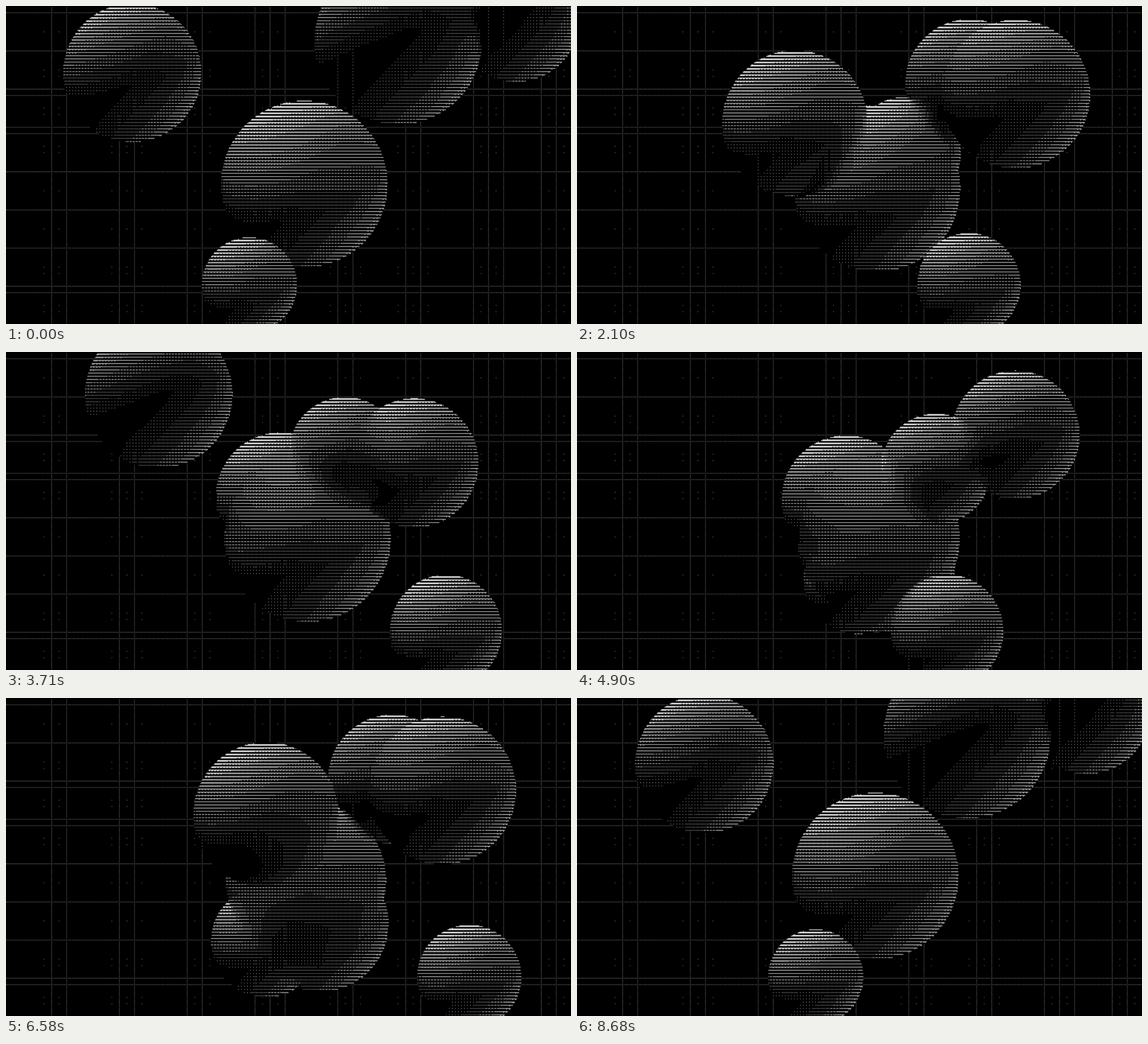
These frames come from a looping animation (998 by 561 pixels, 8750 ms). An HTML page with a canvas:

```html
<!DOCTYPE html>
<html>
<head>
<meta charset="utf-8">
<title>Dithered spheres</title>
<style>
html, body { margin: 0; width: 100%; height: 100%; overflow: hidden; background: #000; }
canvas { display: block; width: 998px; height: 561px; }
</style>
</head>
<body>
<canvas width="750" height="400"></canvas>
<script>
const W = 750, H = 400, SX = 998 / W, SY = 561 / H;
const LOOP = 8750, STEP = 70;
const ctx = document.querySelector('canvas').getContext('2d');
const img = ctx.createImageData(W, H);
const px = new Uint32Array(img.data.buffer);
const grey = v => (255 << 24 | v << 16 | v << 8 | v) >>> 0;
const BLACK = grey(0), LINE = grey(105);

// Grid: a beat pattern of dotted lines, with lone dots between them
const grid = new Uint8Array(W * H);
const mark = (x, y) => { if (x < W && y > 1 && y < H) grid[y * W + x] = 1; };
const cols = [], rows = [];
for (let n = 0; n < 8; n++)
  for (let x = Math.floor(5 + 9.5 * n); x <= 8.6 + 9.6 * n; x++)
    cols.push({ at: x * 10, line: (x - n) % 2 === 0 });
for (let n = 0; n < 16; n++)
  for (const shift of [.26, .74])
    rows.push({ at: Math.floor(1 + 3.1 * n + shift) * 8, line: n % 2 === 0 });
for (const c of cols) {
  if (c.line) for (let y = 2; y < H; y += 2) mark(c.at, y);
  else for (const r of rows) if (!r.line) mark(c.at, r.at);
}
for (const r of rows) if (r.line) for (let x = 0; x < W; x += 2) mark(x, r.at);

// Every path is a sum of whole waves per loop
function spheresAt(t) {
  const turn = 2 * Math.PI / LOOP;
  const c = (k, t0 = 0) => Math.cos(k * turn * (t - t0));
  const s = k => Math.sin(k * turn * t);
  const pulse = ((1 + c(1, 5810)) / 2) ** 12;
  const ball = (x, y, r, depth) =>
    ({ x, y, r, depth, front: .42 - .45 * Math.exp((60 - y) / 90) });
  return [
    ball(530 - 3 * c(1), 322 - 8 * c(1), 147 - 14 * pulse, -40),
    ball(430 - 207 * c(1) - 32 * s(1), 180 - 35 * c(1) - 27 * c(2) + 20 * s(2), 118 + 14 * c(1) - 10 * c(2), 0),
    ball(745 - 25 * c(1) - 27 * c(2) + 38 * s(2), 138 - 52 * c(1) - 25 * c(2) - 32 * s(2), 130 + 18 * c(1), 0),
    ball(680 + 220 * c(1), 145 - 125 * c(1), 114, -50),
    ball(660 - 130 * c(1) - 100 * c(2) + 60 * s(3), 492, 92 - 8 * c(1), 60),
    ball(520 + 60 * s(1), 345 - 25 * c(1) - 85 * s(1), 98, -50),
    ball(530 + 65 * pulse, 325 + 185 * pulse, 120, -50),
    ball(88 + 182 * c(3, 3710), -145 + 222 * c(4, 3760), 130, 0)
  ];
}

// Light from above and from the lower right, glowing edges except at the lower left
function shade(nx, ny, nz, front) {
  const top = Math.max(0, -.3 * nx - .85 * ny + front * nz);
  const side = Math.max(0, .72 * nx + .62 * ny - .02 * nz);
  const away = Math.max(0, -.7 * nx + .7 * ny);
  const rim = (1 - nz) ** 1.5 * Math.max(0, 1 - 1.1 * away);
  return .42 * top + .22 * side + .17 * rim;
}

const rowRank = [3, 2, 0, 1], colRank = [0, 2, 1, 3];
const limit = (x, y) => (rowRank[y & 3] * 4 + colRank[x & 3] + .4) / 16;

function draw(t) {
  const spheres = spheresAt(t);
  for (let y = 0; y < H; y++) {
    const py = (y + .5) * SY;
    const near = spheres.filter(s => Math.abs(py - s.y) < s.r);
    for (let x = 0; x < W; x++) {
      const i = y * W + x, X = (x + .5) * SX;
      let sum = 0, a = 0, b = 0, c = 0, f = 0;
      for (const s of near) {
        const nx = (X - s.x) / s.r, ny = (py - s.y) / s.r, q = 1 - nx * nx - ny * ny;
        if (q <= 0) continue;
        const nz = Math.sqrt(q), w = Math.exp((s.depth + nz * s.r) / 28);
        sum += w; a += w * nx; b += w * ny; c += w * nz; f += w * s.front;
      }
      if (!sum) { px[i] = grid[i] ? LINE : BLACK; continue; }
      const len = Math.hypot(a, b, c) || 1;
      const v = shade(a / len, b / len, c / len, f / sum) + grid[i] * .03;
      px[i] = y > 1 && v > limit(x, y) ? grey(Math.min(230, 120 + 200 * v | 0)) : BLACK;
    }
  }
  ctx.putImageData(img, 0, 0);
}

let last = -1;
function tick() {
  const t = Math.floor(performance.now() % LOOP / STEP) * STEP;
  if (t !== last) draw(last = t);
  requestAnimationFrame(tick);
}
tick();
</script>
</body>
</html>
```
